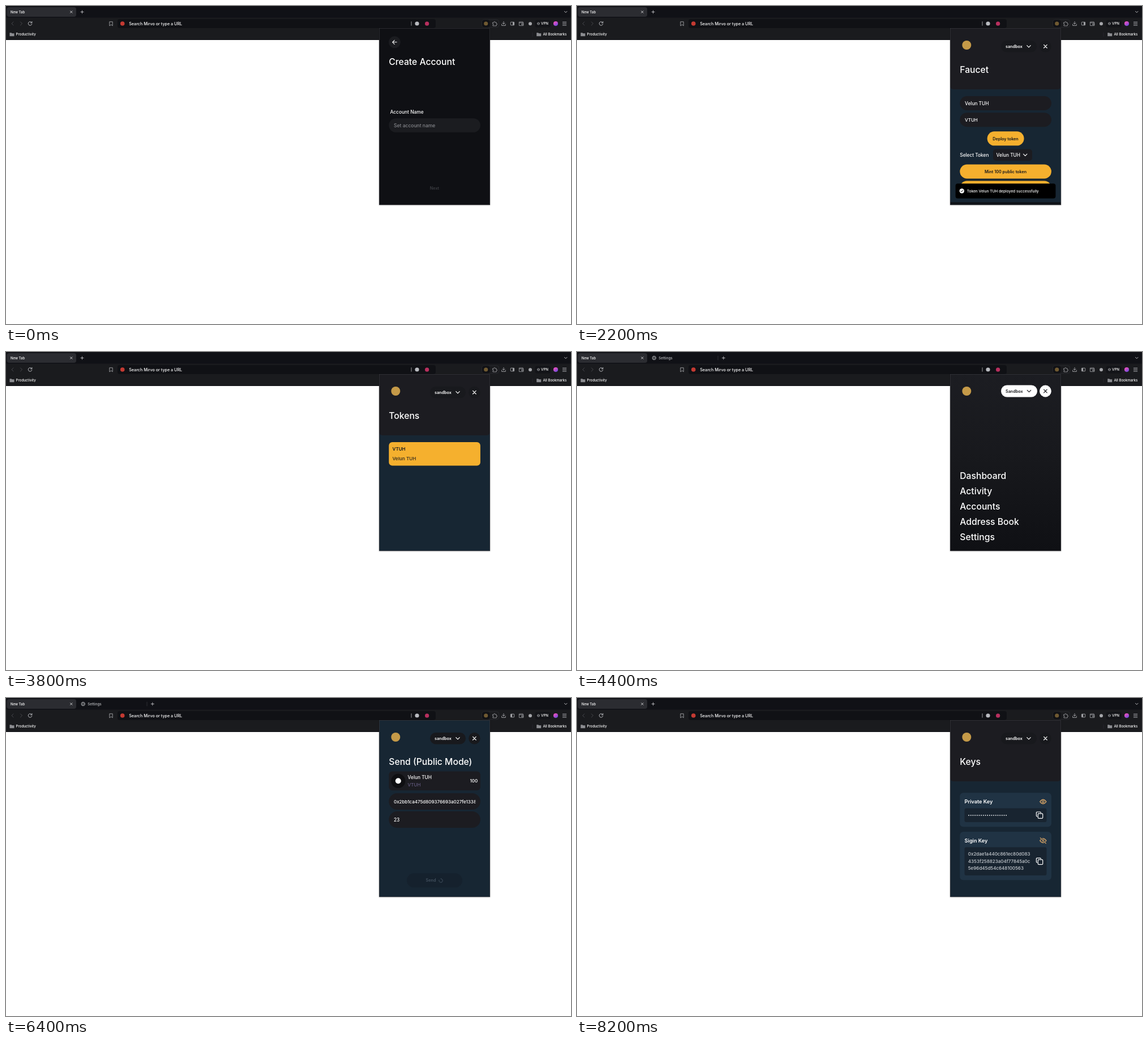
These frames come from a looping animation (998 by 561 pixels, 8.4 s). An HTML page:

```html
<!DOCTYPE html>
<html lang="en">
<head>
<meta charset="utf-8">
<title>Wallet walkthrough</title>
<style>
html, body { margin: 0; width: 100%; height: 100%; overflow: hidden; background: #fff }
svg { display: block; width: 998px; height: 561px }
text { font-family: Inter, "Noto Sans", sans-serif; font-weight: 500; white-space: pre }
</style>
</head>
<body>
<svg id="stage" viewBox="0 0 998 561"></svg>
<script>
const GOLD = '#f5b02e', NAVY = '#172633', COAL = '#1c1c21', INK = '#0f1014', GREY = '#a5a6aa';
const LOOP = 8400, STEP = 200;
const TOKEN = 'Velun TUH', SYMBOL = 'VTUH';

const text = (x, y, s, size = 8.3, fill = '#fff', extra = '') =>
  `<text x="${x}" y="${y}" font-size="${size}" fill="${fill}" ${extra}>${s}</text>`;
const bold = (x, y, s, size, fill, extra = '') =>
  text(x, y, s, size, fill, 'style="font-weight:600" ' + extra);
const mid = 'text-anchor="middle"';
const rect = (x, y, w, h, r, fill, extra = '') =>
  `<rect x="${x}" y="${y}" width="${w}" height="${h}" rx="${r}" fill="${fill}" ${extra}/>`;
const dot = (x, y, r, fill, extra = '') =>
  `<circle cx="${x}" cy="${y}" r="${r}" fill="${fill}" ${extra}/>`;
const line = (d, color = '#fff', w = 1, extra = '') =>
  `<path d="${d}" fill="none" stroke="${color}" stroke-width="${w}" stroke-linecap="round" stroke-linejoin="round" ${extra}/>`;
const group = (id, body) => `<g id="${id}">${body}</g>`;
const cross = (x, y, r, color, w) =>
  line(`M${x - r} ${y - r}l${2 * r} ${2 * r}m0 ${-2 * r}l${-2 * r} ${2 * r}`, color, w);
const plus = (x, y) => line(`M${x - 2.5} ${y}h5m-2.5 -2.5v5`, '#d5d5d8', .8);
const chevron = (x, y, r, color = '#fff', w = 1.2) =>
  line(`M${x - r} ${y - r / 2}l${r} ${r}l${r} ${-r}`, color, w);
const folder = x => `<path d="M${x} 47.3h3l1 1h4v5h-8z" fill="#8d8e92"/>`;
const sidebar = x => rect(891.3, 28.3, 6.4, 5.6, .8, 'none', `stroke="${GREY}" stroke-width=".9"`) +
  rect(x, 28.5, 2.5, 5.2, 0, GREY);

function browser() {
  return rect(0, 0, 998, 21, 0, '#101116') + rect(0, 20.5, 998, 39.5, 0, '#1a1b1e') +
    rect(0, 59, 998, 1, 0, '#111216') +
    rect(1.5, 2, 122.5, 17, 4, '#2b2c31') + text(8, 12.5, 'New Tab', 6) +
    cross(115.3, 10.5, 1.7, '#e4e4e6', .9) +
    group('oneTab', plus(134.5, 10.5)) +
    group('twoTabs',
      dot(136.2, 10.5, 3.1, 'none', `stroke="${GREY}" stroke-width="1.2" stroke-dasharray="1.7 .73"`) +
      dot(136.2, 10.5, 2.7, 'none', `stroke="${GREY}" stroke-width=".7"`) +
      dot(136.2, 10.5, 1, 'none', `stroke="${GREY}" stroke-width=".7"`) +
      text(144.3, 12.6, 'Settings', 6.2, '#bcbdc1') +
      line('M249 7v7', '#3b3c41', .7) + plus(258.8, 10.5)) +
    chevron(988.7, 10.5, 2.2, '#d5d5d8', .9) +
    line('M13 28l-3 3l3 3M25.5 28l3 3l-3 3', '#4b4c51', .9) +
    line('M45.4 29.2a3.3 3.3 0 1 0 .4 2.6M45.9 27.4v2.4h-2.4', '#c9cace', .9) +
    line('M183.2 27.8h5v7l-2.5 -2l-2.5 2z', GREY, .9) +
    rect(197, 23, 562, 16, 4, '#101115') +
    dot(205.7, 31, 3.8, '#c43a32') +
    text(217.2, 33.7, 'Search Mirvo or type a URL', 7.2) +
    line('M716 27.7v6.6', '#d0d0d4', .7) +
    dot(726, 31, 3.6, '#b9bbc0') + dot(743.6, 31.2, 3.6, '#b82f5e') +
    rect(840.7, 24.2, 30, 13.6, 4, 'none', 'stroke="#303136" stroke-width=".7"') +
    rect(841, 24.5, 13.5, 13, 4, '#101115') + dot(847.7, 31, 3.6, '#6f5931') +
    line('M860 29h2c-.5-2 2.3-2 1.8 0h2.4v2.2c2-.5 2 2.1 0 1.7v2.1h-6.2v-2c1.8.3 1.8-2 0-1.7z', GREY, .8) +
    line('M879 27.5v4.5m-2-2l2 2l2-2M875.7 32v2.5h6.6v-2.5', GREY, .9) +
    group('sideRight', sidebar(895)) + group('sideLeft', sidebar(891.6)) +
    line('M907 28h6.2v1.6h.6v5h-7.4v-6zM906.6 29.6h7M911 31.5h2.7v1.5h-2.7z', GREY, .8) +
    dot(926, 31.2, 3, GREY) +
    rect(934.5, 24.7, 27.5, 13, 4, '#131418') +
    dot(940.5, 31, 2, 'none', `stroke="${GREY}" stroke-width=".8"`) +
    line('M938.7 31h3.6', GREY, .7) + text(945, 33.3, 'VPN', 6.2) +
    dot(971, 31.1, 4.1, 'url(#avatar)') +
    line('M983.3 28.4h6.4m-6.4 2.8h6.4m-6.4 2.8h6.4', '#bfc0c4', .9) +
    folder(6.5) + text(17.6, 52.3, 'Productivity', 6.1) +
    line('M930 47v7', '#303136', .6) +
    folder(937.2) + text(948.4, 52.3, 'All Bookmarks', 6.1);
}

const panel = fill => rect(659, 39, 196, 312, 0, fill);
const title = (y, s) => text(676.3, y, s, 15.7);
const field = (y, h, s, size, extra) =>
  rect(676.3, y, 161.6, h, h / 2, COAL) + text(685, y + h / 2 + 3, s, size, '#fff', extra);
const button = (x, y, w, label = '') =>
  rect(x, y, w, 25, 12.5, GOLD) + bold(757, y + 15.3, label, 7.2, '#17181c', mid);

const topBar = () => dot(688.3, 69, 8, '#c59a48') +
  rect(749, 61, 63, 20.5, 10.2, '#18191d') + dot(827.4, 71.2, 10.3, '#18191d') +
  bold(757, 73.8, 'sandbox', 7.2, '#fff') + chevron(798, 71.2, 3.2) + cross(827.4, 71.2, 2.8, '#fff', 1.2);

const withHeader = name => panel(NAVY) +
  `<path d="M659 39h196v102a6 6 0 0 1-6 6h-184a6 6 0 0 1-6-6z" fill="${COAL}"/>` +
  topBar() + title(117.8, name);

// Views take the time since they opened, in ms.
const createAccount = name => u => {
  const focused = u >= 200;
  const typed = name.slice(0, Math.max(0, (u - 200) / 50));
  return panel(INK) +
    dot(686.4, 63.8, 10.5, '#1b1c20') +
    line('M690.2 63.8h-7.4m3.4 -3.5l-3.5 3.5l3.5 3.5', '#fff', 1.1) +
    title(103.6, 'Create Account') +
    text(678.4, 190.3, 'Account Name', 8.4) +
    (focused ? rect(674.5, 196.3, 165, 28.2, 14.1, 'none', 'stroke="#6b6c71" stroke-width=".8"') : '') +
    rect(676.3, 198.2, 161.6, 24.6, 12.3, '#1b1c20', focused ? 'stroke="#44454a" stroke-width=".6"' : '') +
    (typed ? text(685, 213.7, typed, 8.5) : text(685, 213.7, 'Set account name', 8.5, '#85868b')) +
    (focused && !typed ? line('M685.4 206.3v8.8', '#fff', .8) : '') +
    (typed === name ? button(708, 309, 98, 'Next') : bold(757, 324.3, 'Next', 7.2, '#3c3d42', mid));
};

const menu = () => panel('url(#menuFill)') + dot(688.3, 69, 8, '#c59a48') +
  rect(749, 58.5, 64, 21, 10.5, '#fff') + dot(827.4, 69, 10.4, '#fff') +
  bold(757, 71.6, 'Sandbox', 7.2, '#15161a') + chevron(798.5, 69, 3.2, '#15161a') +
  cross(827.4, 69, 2.8, '#15161a', 1.2) +
  ['Dashboard', 'Activity', 'Accounts', 'Address Book', 'Settings']
    .map((s, i) => title(224.2 + 27.05 * i, s)).join('');

const toast = s => rect(668.6, 313.2, 176.8, 26.3, 4, '#000') +
  dot(679.8, 326.3, 4.2, '#fff') + line('M677.9 326.4l1.4 1.4l2.5 -2.8', '#000', 1) +
  text(688.7, 328.7, s, 6.6);

const faucet = u => {
  const deployed = u >= 800;
  return withHeader('Faucet') +
    field(159, 25, u >= 200 ? TOKEN : '') + field(188.2, 25, u >= 400 ? SYMBOL : '', 8) +
    button(724.6, 221.3, 65, 'Deploy token') +
    text(676.3, 265.7, 'Select Token') + rect(735, 252.5, 69, 20.5, 5, COAL) +
    text(740.6, 265.7, deployed ? TOKEN : '') + chevron(791.7, 262.8, 3.2) +
    button(676.3, 279.5, 161.6, 'Mint 100 public token') + button(676.3, 308.5, 161.6) +
    rect(659, 346, 196, 5, 0, '#101419') +
    (deployed ? toast(`Token ${TOKEN} deployed successfully`) : '');
};

const tokens = () => withHeader('Tokens') +
  rect(676.3, 159, 161.6, 41.5, 6, GOLD) +
  bold(682.6, 174, SYMBOL, 8, '#17181c') + bold(682.4, 190.8, TOKEN, 8.2, '#463821');

const send = u => panel(NAVY) + topBar() + title(117.8, 'Send (Public Mode)') +
  rect(676.3, 129.5, 161.6, 33.5, 6, COAL) +
  dot(692.8, 146.3, 12.5, '#0f0f12') + dot(692.8, 146.3, 5, '#fff') +
  text(709.6, 143.2, TOKEN) + text(709.6, 155.6, SYMBOL, 8, '#635b80') +
  text(833.4, 149.2, '100', 8.2, '#fff', 'text-anchor="end"') +
  field(168, 29, u >= 200 ? '0x2bb1ca475d809376693a027fe1338' : '', 8, 'clip-path="url(#field)"') +
  field(200, 29, u >= 400 ? '23' : '') +
  (u < 600 ? button(708, 309.3, 98, 'Send')
    : rect(708, 309.3, 98, 25, 12.5, '#15212d') + bold(741.6, 324.4, 'Send', 7.2, '#445260') +
      line('M768 318.8a3.2 3.2 0 1 1 -3.1 2.4', '#445260', 1,
        `transform="rotate(${(u - 600) * .36} 768 322)"`));

const copy = (x, y) => rect(x - 2.7, y - 2.7, 8.4, 8.4, 1.2, 'none', 'stroke="#fff" stroke-width="1.2"') +
  line(`M${x - 4.2} ${y + 2.2}h-.4q-1 0 -1-1v-5.8q0-1 1-1h5.8q1 0 1 1v.4`, '#fff', 1.2);
const eye = (x, y) => line(`M${x - 5.6} ${y}q5.6 -7.6 11.2 0q-5.6 7.6 -11.2 0z`, '#eab06a', 1.1) +
  dot(x, y, 1.7, 'none', 'stroke="#eab06a" stroke-width="1.1"');
const slash = line('M818.5 246.8l9.6 9.6', '#203344', 2.6) + line('M818.3 246.6l10 10', '#eab06a', 1.1);

// A card grows from one row of bullets to the rows of its key.
function keyCard(y, name, rows) {
  const h = rows ? 49.6 : 24.4;
  const secret = rows
    ? rows.map((s, i) => text(690.8, y + 42 + 12.5 * i, s, 8, '#c8cdd2')).join('')
    : line(`M692.1 ${y + 39.6}H758.4`, '#d9dde1', 2, 'stroke-dasharray="0 3.67"');
  return rect(676.3, y, 161.6, h + 35.6, 6, '#203344') + bold(684.6, y + 18.7, name, 9.1, '#fff') +
    eye(823.3, y + 15.6) + (rows ? slash : '') +
    rect(684.5, y + 27.3, 145, h, 3, '#182430') + secret + copy(817, y + 27.1 + h / 2);
}

const keys = u => withHeader('Keys') + keyCard(167.3, 'Private Key') +
  keyCard(236, 'Sigin Key', u >= 400 &&
    ['0x2dae1a440c861ec80d083', '4353f258823a04f77845a0c', '5e96d45d54c648100563']);

const scenes = [
  [0, createAccount('Main')], [1000, menu], [1400, faucet], [3200, menu], [3600, tokens],
  [4400, menu], [4800, createAccount('Savings')], [5600, menu], [5800, send], [7000, menu], [7400, keys]
];

const byId = id => document.getElementById(id);
const show = (id, on) => byId(id).style.display = on ? '' : 'none';

byId('stage').innerHTML = `<defs>
  <linearGradient id="menuFill" x2="0" y2="1"><stop stop-color="#1c1d22"/><stop offset=".45" stop-color="#18191d"/><stop offset="1" stop-color="#0f1014"/></linearGradient>
  <linearGradient id="avatar" x2=".7" y2="1"><stop offset=".3" stop-color="#e04fc0"/><stop offset="1" stop-color="#6c4be0"/></linearGradient>
  <clipPath id="field"><rect x="685" y="170" width="144.3" height="24"/></clipPath>
  <filter id="blur"><feGaussianBlur stdDeviation=".9"/></filter></defs>` +
  rect(0, 0, 998, 561, 0, '#fff') + browser() +
  rect(659, 39.5, 196, 312, 0, '#000', 'opacity=".35" filter="url(#blur)"') +
  group('view', '') +
  rect(659.3, 39.3, 195.4, 311.4, 0, 'none', 'stroke="#3c3d42" stroke-width=".6"');

let shown = -1;

function draw(now) {
  const t = Math.floor(now % LOOP / STEP) * STEP;
  if (t === shown) return;
  shown = t;
  const [start, view] = scenes.findLast(([begin]) => t >= begin);
  byId('view').innerHTML = view(t - start);
  const settingsOpen = t >= 4200 && t < 7200;
  show('twoTabs', settingsOpen);
  show('oneTab', !settingsOpen);
  show('sideLeft', t >= 4400);
  show('sideRight', t < 4400);
}

function tick() {
  draw(performance.now());
  requestAnimationFrame(tick);
}
tick();
</script>
</body>
</html>
```
